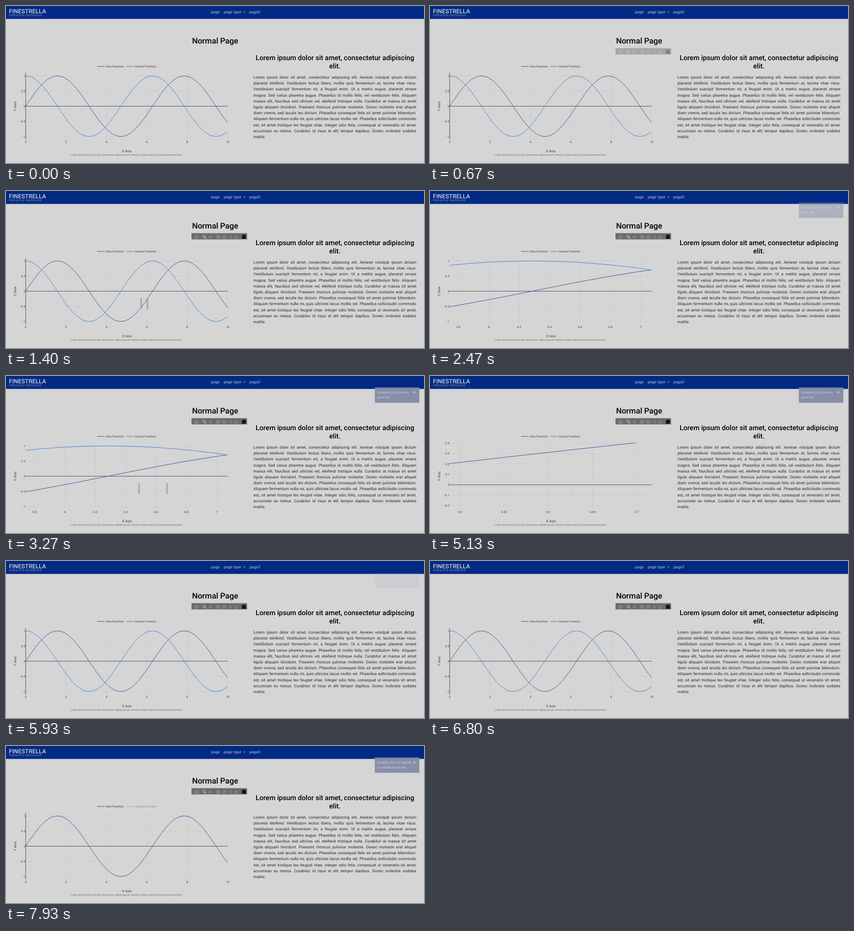
Write an HTML page that moves like this. It is 854x322 px and loops after 8000 ms.

```html
<!DOCTYPE html>
<html lang="en">
<head>
<meta charset="utf-8">
<title>Interactive dashboard</title>
<style>
  html, body { margin: 0; width: 100%; height: 100%; overflow: hidden; background: #d5d5d5; }
  body { position: relative; font-family: Roboto, sans-serif; color: #29292c; text-rendering: geometricPrecision; }
  svg { position: absolute; left: 0; top: 0; }
  .mid { text-anchor: middle; }
  .end { text-anchor: end; }
  .medium { font-weight: 500; }
  .nav { font-size: 8.1px; font-weight: 500; fill: #94a2c2; }
  .small { font-size: 6.1px; fill: #414145; }
  .axis { font-size: 7.1px; fill: #3c3c40; }
  .grid { stroke: #c7c7c7; stroke-width: .6; }
  .zero { stroke: #55555a; stroke-width: 1; }
  .trace { fill: none; stroke-width: 1; stroke-linejoin: round; }
  .sin { stroke: #4353a0; }
  .cos { stroke: #3f86d6; }
  .bar { fill: #d5d5d5; stroke: #66666a; stroke-width: .6; }
  .cursor { stroke: #9b9b9b; stroke-width: .7; }
  .icons { fill: none; stroke: #999; stroke-width: 1; }
  .note rect { fill: #838ca6; }
  .note text { fill: #d9dbe1; font: 6.6px "Open Sans", sans-serif; }
  .note .close { font-size: 10px; font-weight: 700; }

  #copy { position: absolute; left: 505.5px; top: 140px; width: 333px; font-size: 8.13px; line-height: 12.2px; }
  #copy div { white-space: nowrap; text-align: justify; text-align-last: justify; }
  #copy div:last-child { text-align-last: left; }

  /* One shared 8 s loop; 1% is 80 ms. */
  .anim, .view, .bars { animation: 8s linear infinite; }
  .view, .bars, .hard { animation-timing-function: step-end; }
  #modebar { animation-name: modebar; }
  @keyframes modebar { 0%, 7.5% { opacity: 0 } 9.5%, 100% { opacity: 1 } }

  #full { animation-name: full; }
  #zoom1 { animation-name: zoom1; }
  #zoom2 { animation-name: zoom2; }
  #zoom3 { animation-name: zoom3; }
  @keyframes full { 0% { opacity: 1 } 26.25% { opacity: 0 } 71.25%, 100% { opacity: 1 } }
  @keyframes zoom1 { 0% { opacity: 0 } 26.25% { opacity: 1 } 43.5%, 100% { opacity: 0 } }
  @keyframes zoom2 { 0% { opacity: 0 } 43.5% { opacity: 1 } 60%, 100% { opacity: 0 } }
  @keyframes zoom3 { 0% { opacity: 0 } 60% { opacity: 1 } 71.25%, 100% { opacity: 0 } }

  #full .cos { animation: hideTrace 8s step-end infinite; }
  #cosKey { animation-name: dimKey; }
  @keyframes hideTrace { 0% { opacity: 1 } 91.25%, 100% { opacity: 0 } }
  @keyframes dimKey { 0% { opacity: 1 } 91.25%, 100% { opacity: .5 } }

  #drag1 { animation-name: show1; }
  #drag2 { animation-name: show2; }
  #drag3 { animation-name: show3; }
  @keyframes show1 { 0% { opacity: 0 } 16% { opacity: 1 } 26.25%, 100% { opacity: 0 } }
  @keyframes show2 { 0% { opacity: 0 } 35.5% { opacity: 1 } 43.5%, 100% { opacity: 0 } }
  @keyframes show3 { 0% { opacity: 0 } 54% { opacity: 1 } 60%, 100% { opacity: 0 } }
  #drag1 .anim { animation-name: pull1; }
  #drag2 .anim { animation-name: pull2; }
  #drag3 .anim { animation-name: pull3; }
  @keyframes pull1 { 0%, 16% { transform: translateX(6px) } 17.5% { transform: translateX(11px) } 24%, 100% { transform: translateX(54.5px) } }
  @keyframes pull2 { 0%, 35.5% { transform: translateX(6px) } 42.5%, 100% { transform: translateX(70.5px) } }
  @keyframes pull3 { 0%, 54% { transform: translateY(-6px) } 59%, 100% { transform: translateY(-39.5px) } }

  .cursor { animation-name: cursor; }
  @keyframes cursor {
    0% { opacity: 0 }
    46% { opacity: 1; transform: translate(285.5px, 242.5px) }
    54% { opacity: 0 }
    61% { opacity: 1; transform: translate(291.5px, 239.5px) }
    71.25%, 100% { opacity: 0 }
  }

  #zoomNote { animation-name: zoomNote; }
  #legendNote { animation-name: legendNote; }
  @keyframes zoomNote { 0%, 26.5% { opacity: 0 } 35%, 67% { opacity: 1 } 75%, 100% { opacity: 0 } }
  @keyframes legendNote { 0%, 91.25% { opacity: 0 } 98.8%, 100% { opacity: 1 } }
</style>
</head>
<body>
<svg width="854" height="322" viewBox="0 0 854 322">
  <defs><clipPath id="plot"><rect x="40" y="137" width="413" height="137"/></clipPath></defs>

  <rect width="854" height="26.5" fill="#012a84"/>
  <text class="medium" x="6" y="15.2" font-size="12.1" fill="#d0d3da">FINESTRELLA</text>
  <text x="6" y="20.8" font-size="7.05" font-style="italic" fill="#7d879f">Interactive Dashboard</text>
  <text class="nav" x="418.7" y="15.2">page</text>
  <text class="nav" x="444.8" y="15.2">page type</text>
  <path d="M484.6 11.6h4.6l-2.3 2.3z" fill="#94a2c2"/>
  <text class="nav" x="497" y="15.2">page3</text>

  <text class="mid medium" x="427.3" y="77" font-size="16.2">Normal Page</text>
  <g class="mid medium" font-size="14.1">
    <text x="672" y="110.8">Lorem ipsum dolor sit amet, consectetur adipiscing</text>
    <text x="672" y="127.9">elit.</text>
  </g>

  <g class="small">
    <path d="M186 124h15.5" class="trace" stroke="#4a4f6c"/>
    <text x="203.8" y="126.2">Sine Function</text>
    <g id="cosKey" class="anim hard">
      <path d="M246 124h15.5" class="trace" stroke="#6b7384"/>
      <text x="263.3" y="126.2">Cosine Function</text>
    </g>
  </g>

  <g id="charts"></g>

  <text class="axis mid" x="246.8" y="300.2">X Axis</text>
  <text class="axis mid" transform="translate(21 205.5) rotate(-90)">Y Axis</text>
  <text class="mid" x="246.5" y="306.8" font-size="5.08" font-style="italic" fill="#6c6c70">Lorem ipsum dolor sit amet, consectetur adipiscing elit. Aenean volutpat ipsum dictum placerat eleifend.</text>

  <g id="drag1" class="bars">
    <path class="bar" d="M277 220.5h-1.7v21h1.7z"/>
    <path class="bar anim" d="M277 220.5h1.7v21h-1.7z"/>
  </g>
  <g id="drag2" class="bars">
    <path class="bar" d="M272.6 220.5h-1.7v21h1.7z"/>
    <path class="bar anim" d="M272.6 220.5h1.7v21h-1.7z"/>
  </g>
  <g id="drag3" class="bars">
    <path class="bar" d="M274.5 220v1.7h21v-1.7z"/>
    <path class="bar anim" d="M274.5 220v-1.7h21v1.7z"/>
  </g>
  <path class="cursor anim hard" d="M-1.5 0h3M0-1.5v3"/>

  <g id="modebar" class="anim">
    <rect x="379" y="86.5" width="113.5" height="12.8" fill="#6b6b6b"/>
    <g class="icons">
      <path d="M385.5 92h2l1-1h2l1 1h1.5v5h-7.5z"/><circle cx="389.3" cy="94.3" r="1.2"/>
      <g stroke="#d2d2d2"><circle cx="404.5" cy="93" r="2.5"/><path d="M406.5 95l2.4 2.5" stroke-width="1.4"/></g>
      <path d="M414 94.2h7M417.5 90.7v7"/>
      <path d="M430.5 91.2h6v6h-6zM431.5 94.2h4M433.5 92.2v4"/>
      <path d="M443 91.2h6v6h-6zM444 94.2h4"/>
      <path d="M455 91l6.5 6.5M461.5 91l-6.5 6.5"/>
      <path d="M466.5 94.3l3.7-3.3 3.7 3.3M468 94v3.2h4.4V94"/>
    </g>
    <rect x="482" y="89.8" width="8.2" height="8.2" fill="#151515"/>
  </g>

  <g id="zoomNote" class="note anim">
    <rect x="753.5" y="23.5" width="91" height="31.5" opacity=".95"/>
    <text x="758" y="36">Double-click to zoom</text>
    <text x="758" y="46.3">back out</text>
    <text class="close mid" x="834" y="37.3">×</text>
  </g>
  <g id="legendNote" class="note anim">
    <rect x="753.5" y="23.5" width="91" height="31.5" opacity=".95"/>
    <text x="758" y="36">Double-click on legend</text>
    <text x="758" y="46.3">to isolate one trace</text>
    <text class="close mid" x="834" y="37.3">×</text>
  </g>
</svg>

<div id="copy">
  <div>Lorem ipsum dolor sit amet, consectetur adipiscing elit. Aenean volutpat ipsum dictum</div>
  <div>placerat eleifend. Vestibulum lectus libero, mollis quis fermentum at, lacinia vitae risus.</div>
  <div>Vestibulum suscipit fermentum mi, a feugiat enim. Ut a mattis augue, placerat ornare</div>
  <div>magna. Sed varius pharetra augue. Phasellus id mollis felis, vel vestibulum felis. Aliquam</div>
  <div>massa elit, faucibus sed ultrices vel, eleifend tristique nulla. Curabitur at massa sit amet</div>
  <div>ligula aliquam tincidunt. Praesent rhoncus pulvinar molestie. Donec molestie erat aliquet</div>
  <div>diam viverra, sed iaculis leo dictum. Phasellus consequat felis sit amet pulvinar bibendum.</div>
  <div>Aliquam fermentum nulla mi, quis ultricies lacus mollis vel. Phasellus sollicitudin commodo</div>
  <div>est, sit amet tristique leo feugiat vitae. Integer odio felis, consequat ut venenatis sit amet,</div>
  <div>accumsan eu metus. Curabitur id risus et elit tempor dapibus. Donec molestie sodales</div>
  <div>mattis.</div>
</div>

<script>
  const box = { left: 40.3, right: 452.6, top: 137.3, bottom: 273.7 };
  const views = [
    { id: 'full', x: [0, 10], y: [-1.1, 1.1], dx: 2, dy: .5 },
    { id: 'zoom1', x: [5.743, 7.0707], y: [-1.1, 1.1], dx: .2, dy: .5 },
    { id: 'zoom2', x: [6.4885, 6.7167], y: [-1.1, 1.1], dx: .05, dy: .5 },
    { id: 'zoom3', x: [6.4885, 6.7167], y: [-.237, .402], dx: .05, dy: .1 }
  ];

  const scale = ([a, b], from, to) => v => from + (v - a) / (b - a) * (to - from);
  const label = v => String(v).replace('-', '\u2212');

  function ticks([a, b], step) {
    const list = [];
    for (let i = Math.ceil(a / step); i * step <= b + 1e-9; i++) list.push(+(i * step).toFixed(2));
    return list;
  }

  function chart({ id, x, y, dx, dy }) {
    const px = scale(x, box.left, box.right);
    const py = scale(y, box.bottom, box.top);
    const line = (name, d) => `<path class="${name}" d="${d}"/>`;
    const column = v => `M${px(v)} ${box.top}V${box.bottom}`;
    const row = v => `M${box.left} ${py(v)}H${box.right}`;
    const curve = fn => 'M' + Array.from({ length: 100 }, (_, i) => {
      const v = i * 10 / 99;
      return px(v).toFixed(2) + ' ' + py(fn(v)).toFixed(2);
    }).join('L');
    const xs = ticks(x, dx), ys = ticks(y, dy);

    return `<g id="${id}" class="view">` +
      line('grid', xs.map(column).join('') + ys.map(row).join('')) +
      line('zero', row(0) + (x[0] === 0 ? column(0) : '')) +
      `<g clip-path="url(#plot)">${line('trace sin', curve(Math.sin))}${line('trace cos', curve(Math.cos))}</g>` +
      xs.map(v => `<text class="small mid" x="${px(v)}" y="281.2">${label(v)}</text>`).join('') +
      ys.map(v => `<text class="small end" x="39.6" y="${py(v) + 2.2}">${label(v)}</text>`).join('') +
      '</g>';
  }

  document.getElementById('charts').innerHTML = views.map(chart).join('');
</script>
</body>
</html>
```
